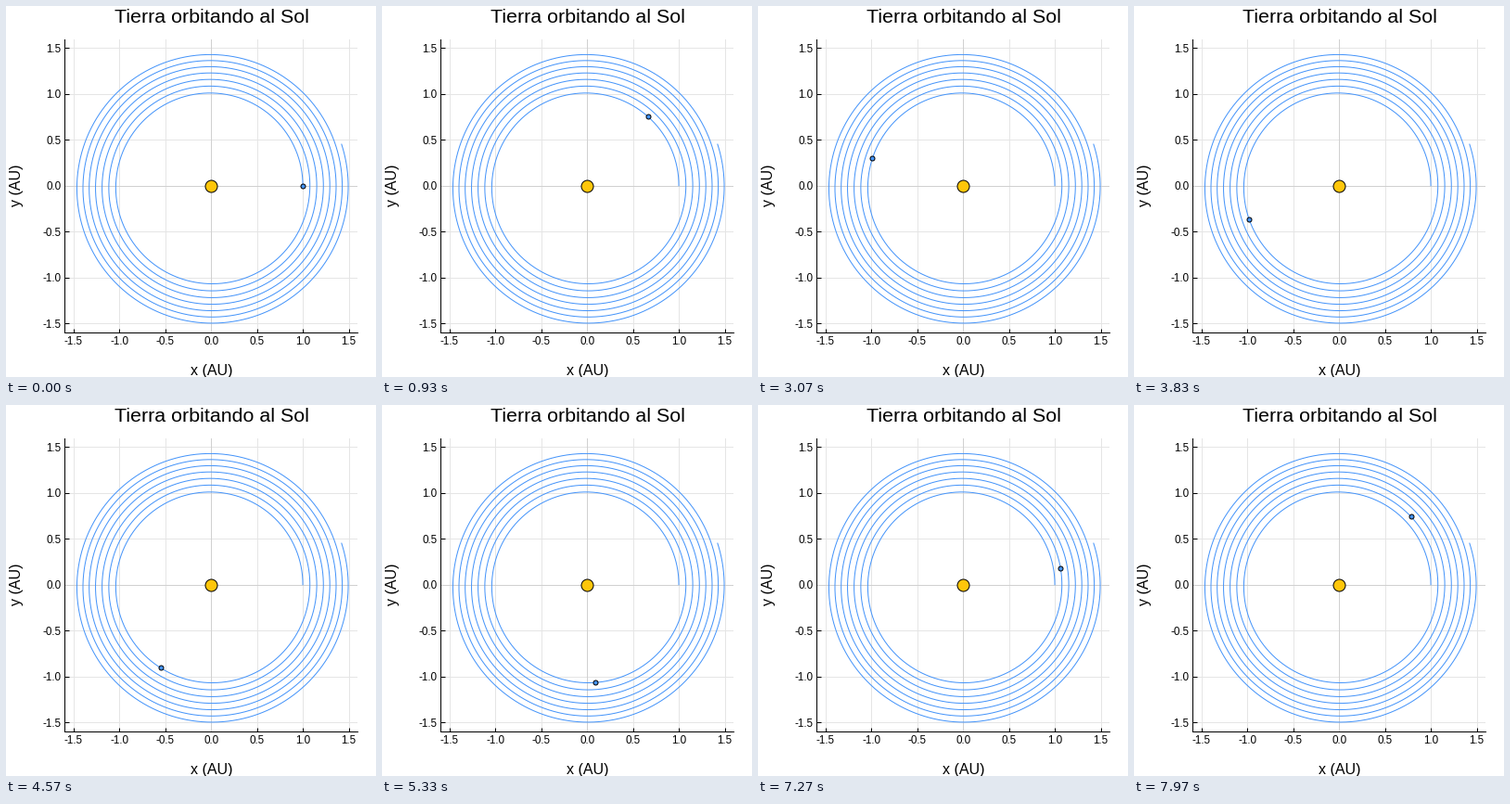
Recreate the animation shown at these times as a matplotlib script. Size 399 by 400 pixels, loop 8000 ms.

```python
import math

import numpy as np
import matplotlib.pyplot as plt
from matplotlib.animation import FuncAnimation

W, H, DPI = 399, 400, 100
PT = 72 / DPI  # points per pixel
LEFT, RIGHT, TOP, BOTTOM = 63, 379.4, 35.5, 352
LIMIT = 1.6
BLUE, GOLD = "#4594fa", "#ffc60a"

FRAMES, LOOP_MS = 240, 8000
DT, STEPS, STEPS_PER_FRAME = 0.001, 10000, 5
GM = 4 * math.pi ** 2  # AU^3 / year^2

plt.rcParams["font.family"] = "Liberation Sans"
plt.rcParams["axes.unicode_minus"] = False


def orbit():
    """Explicit Euler integration, which slowly spirals outwards."""
    x, y, vx, vy = 1.0, 0.0, 0.0, 2 * math.pi
    path = [(x, y)]
    for _ in range(STEPS):
        pull = GM / math.hypot(x, y) ** 3
        ax_, ay_ = -pull * x, -pull * y
        x, y = x + vx * DT, y + vy * DT
        vx, vy = vx + ax_ * DT, vy + ay_ * DT
        path.append((x, y))
    return np.array(path)


def label(x, y, text, px, **kw):
    fig.text(x / W, 1 - y / H, text, fontsize=px * PT, ha="center",
             va="baseline", **kw)


def dot(x, y, px, color, z):
    return ax.plot([x], [y], "o", ms=px * PT, mfc=color, mec="black",
                   mew=1 * PT, zorder=z)[0]


path = orbit()
fig = plt.figure(figsize=(W / DPI, H / DPI), dpi=DPI, facecolor="white")
ax = fig.add_axes([LEFT / W, 1 - BOTTOM / H,
                   (RIGHT - LEFT) / W, (BOTTOM - TOP) / H])
ax.set(xlim=(-LIMIT, LIMIT), ylim=(-LIMIT, LIMIT))
ax.set_axisbelow(True)

ticks = np.arange(-1.5, 1.6, 0.5)
names = [f"{t:.1f}" for t in ticks]
ax.set_xticks(ticks, names)
ax.set_yticks(ticks, names)
ax.tick_params(direction="in", length=4.5 * PT, width=1 * PT,
               labelsize=11.6 * PT)
ax.tick_params(axis="x", pad=4 * PT)
ax.tick_params(axis="y", pad=3.5 * PT)
ax.grid(color="#e5e5e5", lw=1 * PT)
for side in ("top", "right"):
    ax.spines[side].set_visible(False)
for side in ("left", "bottom"):
    ax.spines[side].set_linewidth(1 * PT)

ax.axhline(0, color="#d0d0d0", lw=1 * PT, zorder=1)
ax.axvline(0, color="#d0d0d0", lw=1 * PT, zorder=1)
ax.plot(path[:, 0], path[:, 1], color=BLUE, lw=1 * PT, zorder=2)
dot(0, 0, 13, GOLD, 3)
earth = dot(1, 0, 5, BLUE, 4)

label(221.5, 18, "Tierra orbitando al Sol", 21.4)
label(221.5, 398, "x (AU)", 16)
label(16, 193.5, "y (AU)", 16, rotation=90, rotation_mode="anchor")


def draw(i):
    x, y = path[i * STEPS_PER_FRAME]
    earth.set_data([x], [y])
    return (earth,)


anim = FuncAnimation(fig, draw, frames=FRAMES, interval=LOOP_MS / FRAMES,
                     repeat=True, repeat_delay=0, blit=False)
plt.show()
```
